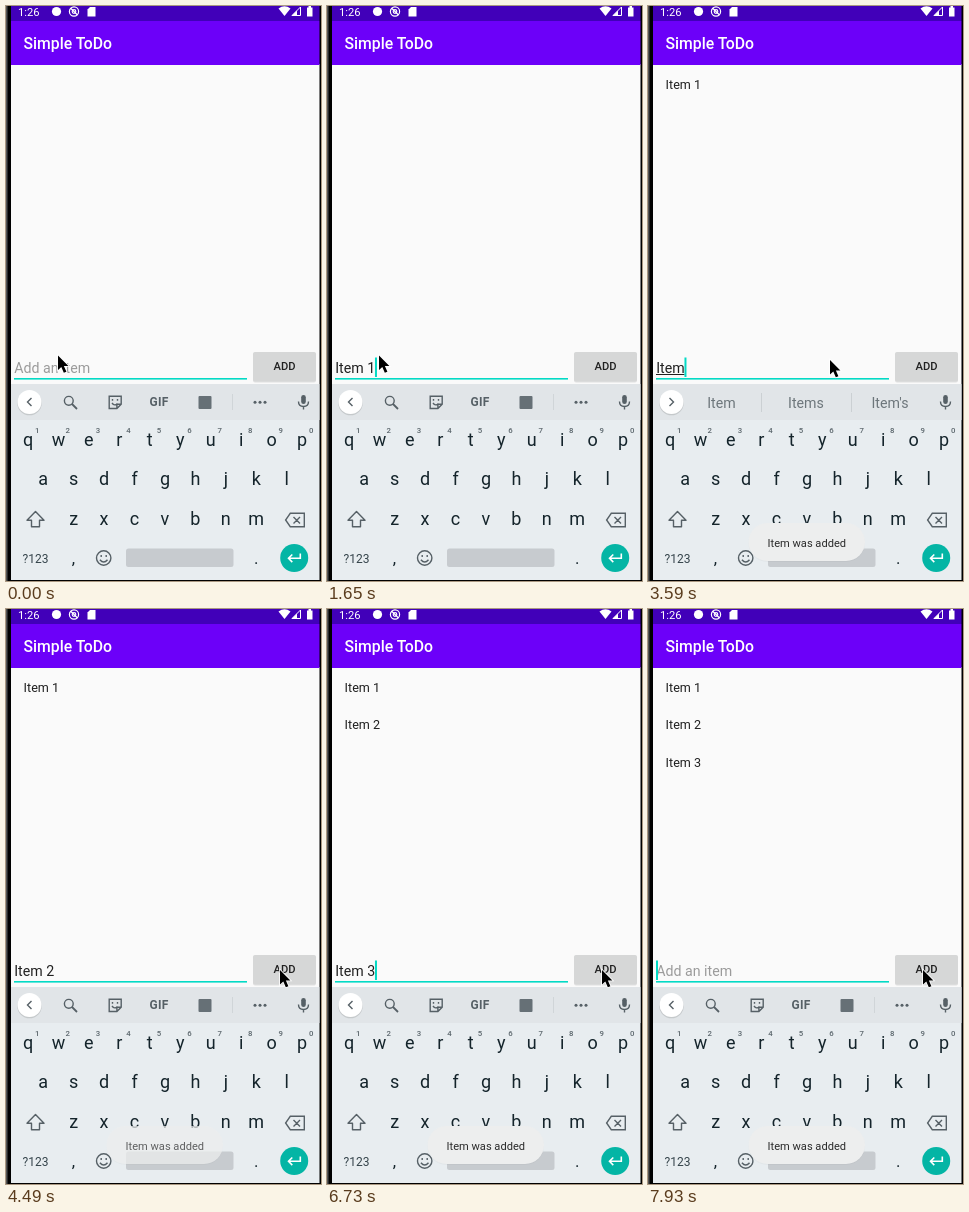
Animation of 315 by 575 pixels, one loop 8 s. Source, as an HTML page:

```html
<!DOCTYPE html>
<html lang="en">
<head>
<meta charset="utf-8">
<title>To-do list demo</title>
<style>
html, body { margin: 0; width: 100%; height: 100%; overflow: hidden; background: #000; }
svg { display: block; width: 315px; height: 575px; }
text { font-family: Roboto, sans-serif; white-space: pre; }
.mid { text-anchor: middle; }
.key { font-size: 18px; fill: #14242b; }
.num { font-size: 7.8px; font-weight: 500; fill: #5c676d; }
.word { font-size: 14.2px; fill: #6d767b; }
.item { font-size: 12.6px; fill: #212121; }
.line { fill: none; stroke: #566066; stroke-width: 1.4; }
</style>
</head>
<body>
<svg id="stage" viewBox="0 0 315 575" xmlns="http://www.w3.org/2000/svg">
  <rect width="315" height="575" fill="#000"/>
  <rect width="1.5" height="575" fill="#555"/>
  <rect x="5" y="58" width="308.5" height="320" fill="#fafafa"/>
  <rect x="5" width="308.5" height="15" fill="#4100b9"/>
  <rect x="5" y="15" width="308.5" height="44" fill="#6c00f9"/>

  <g fill="#fff">
    <text x="12" y="10" font-size="11.2">1:26</text>
    <circle cx="50.5" cy="5.5" r="4.6"/>
    <g fill="none" stroke="#fff" stroke-width="1.2">
      <circle cx="68" cy="5.5" r="4.6"/><circle cx="68" cy="5.5" r="1.8"/><path d="M65 2.5L71.5 9"/>
    </g>
    <path d="M84 1h5.5v9.5h-8v-7z"/>
    <path d="M272.5 2.5Q278.5-2 284.5 2.5L278.5 10z"/>
    <path d="M294.5 1V9.500h-8.500z" fill="none" stroke="#fff"/><path d="M291 4.500V10h-5.500z"/>
    <path d="M301 1.5h1.5v-1.5h2.5v1.5h1.5v9h-5.5z"/>
    <text x="17.5" y="43" font-size="15.8" font-weight="500">Simple ToDo</text>
  </g>

  <g id="list"></g>
  <rect x="8" y="372" width="233" height="1.6" fill="#03dac5"/>
  <text id="input" x="8.2" y="366.5" font-size="14.2"></text>
  <rect id="under" x="8" y="368" height="1" fill="#212121"/>
  <rect id="caret" y="351.5" width="2" height="19.5" fill="#03dac5"/>

  <rect x="247" y="346.5" width="63" height="30" rx="2" fill="#000" opacity=".1"/>
  <rect x="247" y="346" width="63" height="29.5" rx="2" fill="#d6d7d7"/>
  <rect id="press" x="247" y="346" width="63" height="29.5" rx="2" fill="#000"/>
  <text class="mid" x="278.5" y="364.3" font-size="11.2" font-weight="500" fill="#212121">ADD</text>

  <rect x="5" y="378" width="308.5" height="196" fill="#e8edf0"/>
  <rect x="5" y="378" width="308.5" height="36" fill="#e1e5e8"/>
  <circle cx="23.5" cy="397" r="12.3" fill="#000" opacity=".12"/>
  <circle cx="23.5" cy="396" r="12" fill="#fff"/>
  <path id="chevron" class="line"/>

  <g id="tools">
    <g class="line">
      <circle cx="62.8" cy="394.8" r="4.4"/><path d="M66 398l5 5" stroke-width="1.8"/>
      <path d="M103.200 390.200h12v8l-4.300 4.300h-7.700zM115.200 398.200h-4.300v4.300M106 397q2.500 3.500 5.500 .5M106.500 393v1.700M111.500 393v1.700"/>
    </g>
    <text class="mid" x="153" y="400.3" font-size="12" font-weight="700" letter-spacing=".3" fill="#566066">GIF</text>
    <rect x="192.5" y="390" width="13" height="13" rx="1" fill="#667076"/>
    <rect x="226" y="388" width="1" height="16" fill="#d0d5d8"/>
    <g fill="#566066"><circle cx="249" cy="396.3" r="1.5"/><circle cx="254" cy="396.3" r="1.5"/><circle cx="259" cy="396.3" r="1.5"/></g>
  </g>
  <g id="words">
    <rect x="113" y="387" width="1" height="19" fill="#cbd0d3"/>
    <rect x="203" y="387" width="1" height="19" fill="#cbd0d3"/>
  </g>
  <rect x="295.2" y="389" width="4.6" height="9" rx="2.3" fill="#566066"/>
  <path class="line" d="M292.5 395.5q0 5 5 5t5-5M297.5 400.5v3"/>

  <g id="keys"></g>
  <path class="line" d="M29.5 505.500l8.500 8.700h-4.500v6.600h-8v-6.600h-4.500z" stroke-linejoin="round"/>
  <path class="line" d="M284.300 507.300h14v13.400h-14l-4.700-6.700zM287.500 511l6.500 6.500M294 511l-6.500 6.500"/>
  <g fill="#14242b">
    <text class="mid" x="29.5" y="556.5" font-size="12" fill="#34434a">?123</text>
    <text class="mid" x="67.5" y="557.5" font-size="17">,</text>
    <text class="mid" x="250.3" y="557.5" font-size="17">.</text>
  </g>
  <circle class="line" cx="97.7" cy="552" r="7.2"/>
  <path class="line" d="M93.9 553.8q3.800 4.500 7.600 0M95.200 549v2M100.200 549v2"/>
  <rect x="120" y="542.5" width="107.5" height="18.5" rx="2.5" fill="#c7cbcf"/>
  <circle cx="288.2" cy="552" r="14" fill="#04b5a5"/>
  <path d="M294.300 547.500v4.800h-11.500M286.300 548.500l-3.800 3.800 3.800 3.800" fill="none" stroke="#fff" stroke-width="1.6"/>

  <g id="toast">
    <rect x="100.5" y="518" width="116.5" height="38" rx="19" fill="#000" opacity=".03"/>
    <rect x="100.5" y="517" width="116.5" height="38" rx="19" fill="#edeeee"/>
    <text x="119.5" y="540.8" font-size="11.1" fill="#2b2b2b">Item was added</text>
  </g>
  <path id="mouse" d="M0 0v14.500l3.300-3 2.500 5.800 2.600-1.100-2.500-5.700h4.500z" fill="#000" stroke="#fff" stroke-width="1.6" paint-order="stroke"/>
</svg>
<script>
const LOOP = 8000, STEP = 150;
const $ = id => document.getElementById(id);
const set = (el, attrs) => { for (const k in attrs) el.setAttribute(k, attrs[k]); };

function label(parent, cls, x, y, str) {
  const el = document.createElementNS("http://www.w3.org/2000/svg", "text");
  set(el, { class: cls, x, y });
  el.textContent = str;
  parent.appendChild(el);
  return el;
}

[["qwertyuiop", 22, 439.8], ["asdfghjkl", 37.2, 478.7], ["zxcvbnm", 67.6, 518.9]].forEach(([row, x, y], r) => {
  [...row].forEach((ch, i) => {
    const cx = x + i * 30.44;
    label($("keys"), "mid key", cx, y, ch);
    if (!r) label($("keys"), "mid num", cx + 9.2, 427, (i + 1) % 10);
  });
});
const items = [1, 2, 3].map((n, i) => label($("list"), "item", 17.6, 82.5 + i * 37.65, "Item " + n));
const words = [73.5, 158, 242].map(x => label($("words"), "mid word", x, 401.7, ""));

// All times below count steps of 150 ms.
const typed = [
  [0, ""], [2, "I"], [5, "It"], [6, "Ite"], [7, "Item"], [8, "Item "], [11, "Item 1"], [15, ""],
  [21, "I"], [23, "It"], [24, "Item"], [25, "Item "], [27, "Item 2"], [32, ""],
  [37, "I"], [39, "It"], [40, "Ite"], [41, "Item"], [42, "Item "], [44, "Item 3"], [50, ""]
];
const guesses = {
  "I": ["I", "I'm", "I'll"],
  "It": ["It", "It's", "Its"],
  "Ite": ["Ite", "Item", "Items"],
  "Item": ["Item", "Items", "Item's"],
  "Item ": ["is", "in", "number"]
};
const addedAt = [16, 33, 51];
const caretOff = [[0, 2], [14, 15], [19, 21], [30, 32], [35, 37], [47, 50]];
const toastKeys = [[16, 0], [18, 1], [28, 1], [30, .72], [32, 0], [33, 0], [35, 1], [45, 1], [47, .72], [49, 0], [51, 0], [53, 1]];
const pressKeys = [[13, 0], [14, .12], [15, .12], [17, 0], [30, 0], [31, .12], [33, .1], [35, 0], [48, 0], [49, .12], [51, .08], [53, 0]];
const mouseX = [[11, 52], [12, 120], [13, 225], [14, 274], [15, 274], [16, 262], [17, 215], [18, 182], [27, 182], [28, 205], [29, 252], [30, 274], [31, 275]];
const mouseY = [[11, 349.5], [14, 361], [15, 361], [18, 354], [27, 354], [30, 361]];

function mix(keys, n) {
  if (n <= keys[0][0]) return keys[0][1];
  for (let i = 1; i < keys.length; i++) {
    const [a, u] = keys[i - 1], [b, v] = keys[i];
    if (n <= b) return u + (v - u) * (n - a) / (b - a);
  }
  return keys[keys.length - 1][1];
}

function draw(t) {
  const lead = t > 6200 ? 20 : t > 2600 ? 10 : 0;
  const n = Math.floor((t + lead) / STEP);

  const text = typed.filter(k => k[0] <= n).pop()[1];
  const input = $("input");
  input.textContent = text;
  const width = text ? input.getComputedTextLength() : 0;
  if (!text) input.textContent = "Add an item";
  set(input, { fill: text ? "#212121" : "#9b9b9b" });

  const composing = text && text.length < 5;
  set($("under"), { width: composing ? width : 0 });
  const off = caretOff.some(([a, b]) => n >= a && n < b);
  set($("caret"), { x: 8 + width, opacity: off ? 0 : 1 });

  const guess = guesses[text];
  set($("tools"), { opacity: guess ? 0 : 1 });
  set($("words"), { opacity: guess ? 1 : 0 });
  words.forEach((w, i) => { w.textContent = guess ? guess[i] : ""; });
  set($("chevron"), { d: guess ? "M21.5 392l4 4-4 4" : "M25.5 392l-4 4 4 4" });

  items.forEach((el, i) => set(el, { opacity: n >= addedAt[i] ? 1 : 0 }));
  set($("press"), { opacity: mix(pressKeys, n) });
  set($("toast"), { opacity: mix(toastKeys, n) });
  set($("mouse"), { transform: `translate(${mix(mouseX, n)} ${mix(mouseY, n)})` });
}

const start = performance.now();
function tick() {
  draw((performance.now() - start) % LOOP);
  requestAnimationFrame(tick);
}
tick();
</script>
</body>
</html>
```
